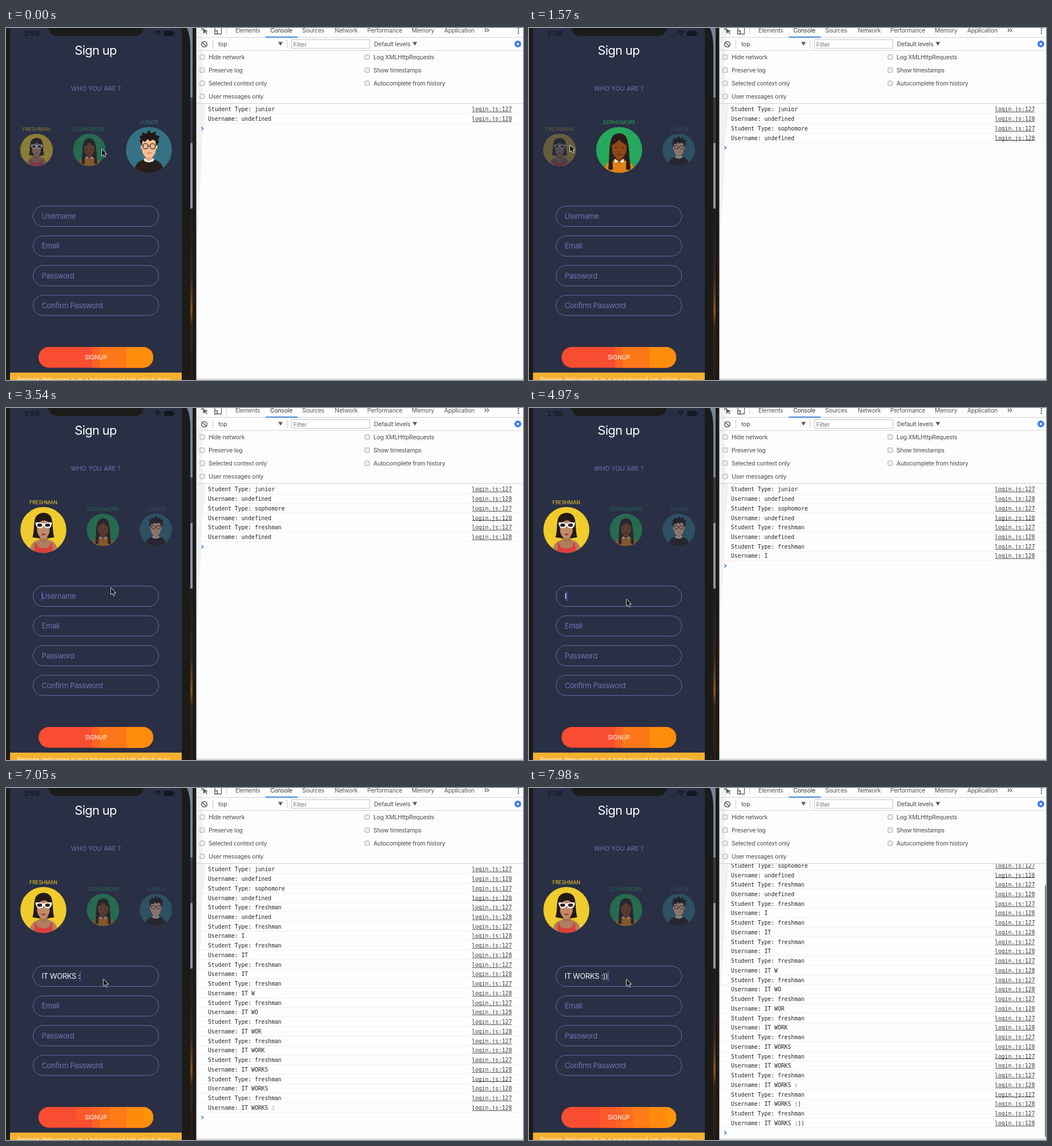
Recreate the animation shown at these times as an HTML page with a canvas. Size 906x618 px, loop 8000 ms.

```html
<!DOCTYPE html>
<html lang="en">
<head>
<meta charset="utf-8">
<title>Sign up form with console</title>
<style>
  html, body { margin: 0; width: 100%; height: 100%; overflow: hidden; background: #fdfdfd; }
  canvas { display: block; width: 906px; height: 618px; }
</style>
</head>
<body>
<canvas id="stage"></canvas>
<script>
const W = 906, H = 618, LOOP = 8000;
const canvas = document.getElementById('stage');
const ctx = canvas.getContext('2d');
const dpr = window.devicePixelRatio || 1;
canvas.width = W * dpr;
canvas.height = H * dpr;

const SANS = 'Inter, "Open Sans", sans-serif';
const MONO = '"DejaVu Sans Mono", "Liberation Mono", monospace';
const SCREEN = '#292f44', BEZEL = '#1b1b19', LINE = '#6470b0';
const TYPED = 'IT WORKS :))';

// ---------- drawing helpers ----------
function rect(x, y, w, h, color) {
  ctx.fillStyle = color;
  ctx.fillRect(x, y, w, h);
}

function fill(path, color) {
  ctx.fillStyle = color;
  ctx.fill(new Path2D(path));
}

function stroke(path, color, width = 1) {
  ctx.strokeStyle = color;
  ctx.lineWidth = width;
  ctx.stroke(new Path2D(path));
}

function ellipse(x, y, rx, ry, color) {
  ctx.fillStyle = color;
  ctx.beginPath();
  ctx.ellipse(x, y, rx, ry, 0, 0, Math.PI * 2);
  ctx.fill();
}

function ring(x, y, r, color, width) {
  ctx.strokeStyle = color;
  ctx.lineWidth = width;
  ctx.beginPath();
  ctx.arc(x, y, r, 0, Math.PI * 2);
  ctx.stroke();
}

function pill(x, y, w, h, r) {
  ctx.beginPath();
  ctx.roundRect(x, y, w, h, r);
}

// y is the middle of the capitals
function text(s, x, y, size, color, { align = 'left', weight = 400, gap = 0, face = SANS } = {}) {
  ctx.font = `${weight} ${size}px ${face}`;
  ctx.letterSpacing = gap + 'px';
  ctx.textAlign = align;
  ctx.fillStyle = color;
  ctx.fillText(s, x, y + size * 0.36);
}

// latest value of a [time, value] list
function at(list, t) {
  let value = list[0][1];
  for (const [time, v] of list) if (t >= time) value = v;
  return value;
}

// ---------- timeline ----------
const cursorMoves = [
  // start, end, steps, x, y
  [120, 120, 1, 153, 211],
  [850, 1330, 5, 72, 206],
  [2160, 2940, 9, 184, 315],
  [3060, 3060, 1, 184, 316],
  [3930, 4290, 4, 171, 336]
];

function cursorAt(t) {
  let x = 168, y = 213;
  for (const [start, end, n, tx, ty] of cursorMoves) {
    if (t < start) break;
    const step = n > 1 ? (end - start) / (n - 1) : 1;
    const k = Math.min(n, Math.floor((t - start) / step + 1e-6) + 1) / n;
    const e = k * k * (3 - 2 * k);
    x += (tx - x) * e;
    y += (ty - y) * e;
  }
  return [x, y];
}

const selected = [[0, 2], [470, 1], [1720, 0]];
const typedCount = [[0, 0], [4970, 1], [5080, 2], [5230, 3], [5560, 4], [5710, 6], [5830, 7],
  [5940, 8], [6480, 9], [7050, 10], [7530, 11], [7980, 12]];
const rowCount = [[0, 2], [470, 4], [1720, 6], [4970, 8], [5080, 9], [5230, 12], [5560, 14],
  [5710, 18], [5830, 20], [5940, 22], [6480, 24], [7050, 26], [7530, 28], [7980, 30]];
const caretOn = [[0, false], [3540, true], [4050, false], [4670, true]];
const alphas = [
  [[0, 0.5], [1570, 0.3], [1720, 0.6], [1830, 0.85], [1950, 1]],
  [[0, 0.5], [350, 0.35], [470, 0.65], [620, 1], [1720, 0.5]],
  [[0, 1], [470, 0.5]]
];

// ---------- avatars, drawn around 0,0 with radius 40 ----------
function drawFreshman() {
  fill('M-24 42 C-24 23 -16 20 -7 17 L-6 6 H7 L8 17 C17 20 25 23 25 42 Z', '#b17d5c');
  fill('M-19 13 C-16 2 -17 -10 -15 -18 C-12 -34 13 -34 15 -18 C17 -10 16 2 19 13 L7 15 H-6 Z', '#241a18');
  fill('M-6 8 H7 V19 Q0 23 -6 19 Z', '#a67252');
  fill('M-11 -15 Q0 -19 11 -15 V2 C10 10 4 16 0 16 C-4 16 -10 10 -11 2 Z', '#c08a68');
  fill('M-12 -9 C-13 -20 -4 -24 0 -24 C8 -24 13 -20 12 -9 Q9 -15 2 -17 Q-7 -16 -12 -9 Z', '#241a18');
  fill('M-16 42 L-15 23 L-13 23 L-10 30 Q0 35 10 30 L13 23 L15 23 L17 42 Z', '#dd3d3c');
  fill('M-14 -13 Q-7 -14 0 -11 Q8 -14 15 -13 Q15 -3 7.5 -3 Q2 -3 0.5 -8 Q-1 -3 -6.5 -3 Q-13 -3 -14 -13 Z', '#fff');
  ellipse(-6.5, -8.2, 4.4, 3, '#2c2628');
  ellipse(7.3, -8.2, 4.4, 3, '#2c2628');
  ellipse(0.3, 8, 3.8, 1.4, '#a9343b');
}

function drawSophomore() {
  fill('M-18 36 C-17 10 -18 0 -15 -15 C-12 -34 12 -34 15 -15 C18 0 17 10 19 36 Z', '#2a1c18');
  fill('M-27 42 C-27 24 -19 21 -8 18 H8 C19 21 27 24 27 42 Z', '#df8214');
  fill('M-6 8 H6 V18 L0 23 L-6 18 Z', '#75370f');
  fill('M-13 -8 Q-5 -12 0 -18 Q6 -12 13 -8 V1 C11 10 4 16 0 16 C-4 16 -11 10 -13 1 Z', '#8e4818');
  fill('M-9 15 L0 21 L9 15 L7 23 L0 20 L-7 23 Z', '#f3eee8');
  fill('M-16 -10 Q-12 -9 -12 2 L-11 34 Q-17 37 -19 33 Z M16 -10 Q12 -9 13 2 L12 34 Q18 37 20 33 Z', '#2a1c18');
  ellipse(-6, -4, 1.6, 1, '#3a2013');
  ellipse(6, -4, 1.6, 1, '#3a2013');
  ellipse(0, 8, 3.8, 1.3, '#642c12');
}

function drawJunior() {
  fill('M-26 42 C-26 24 -17 19 -8 17 H8 C17 19 26 24 26 42 Z', '#271e1a');
  fill('M-6 7 H6 V17 L0 21 L-6 17 Z', '#e3a97f');
  fill('M-12 -20 H12 V1 C11 10 5 14 0 14 C-5 14 -11 10 -12 1 Z', '#f6bd91');
  ellipse(-12.5, -5, 2.3, 3.6, '#f6bd91');
  ellipse(12.5, -5, 2.3, 3.6, '#f6bd91');
  fill('M-13 -8 L-17 -17 L-14 -18 L-17 -25 L-12 -25 L-12 -31 L-5 -28 L0 -35 L4 -29 L12 -32 L12 -26 ' +
    'L19 -24 L16 -18 L18 -14 L13 -8 L11 -16 L6 -18 L2 -15 L-2 -19 L-7 -14 L-11 -16 Z', '#211917');
  ring(-6, -6.5, 4.6, '#2b211f', 1.3);
  ring(6.5, -6.5, 4.6, '#2b211f', 1.3);
  stroke('M-1.5 -7 H2 M-10.5 -8 H-13 M11 -8 H13', '#2b211f', 1.2);
  stroke('M-3 5 Q0 7 4 5', '#a55f4b', 1.2);
  fill('M-9 14 L0 20 L9 14 L8 20 L0 22 L-8 20 Z', '#f5f1ec');
}

const people = [
  ['FRESHMAN', '#efcb2d', drawFreshman],
  ['SOPHOMORE', '#25a85c', drawSophomore],
  ['JUNIOR', '#357283', drawJunior]
];

function drawPeople(t) {
  const chosen = at(selected, t);
  let left = 25;
  people.forEach(([label, color, draw], i) => {
    const big = i === chosen;
    const size = big ? 81 : 57;
    const x = left + size / 2, y = 214;
    const alpha = at(alphas[i], t);
    left += size + 35.5;
    ctx.save();
    ctx.translate(x, y);
    ctx.scale(size / 81, size / 81);
    ctx.beginPath();
    ctx.arc(0, 0, 40.3, 0, Math.PI * 2);
    ctx.clip();
    rect(-41, -41, 82, 82, color);
    draw();
    ctx.globalAlpha = 1 - alpha;
    rect(-41, -41, 82, 82, SCREEN);
    ctx.restore();
    ctx.globalAlpha = alpha;
    text(label, x, big ? 165.5 : 177.5, 8.8, color, { align: 'center' });
    ctx.globalAlpha = 1;
  });
}

// ---------- phone ----------
function drawPhoneShell() {
  rect(0, 0, 334, H, '#1c1a19');
  rect(316, 0, 11, 122, '#76859a');
  rect(322, 122, 5, 80, '#343b4a');
  rect(322, 202, 5, 115, '#8f97a3');
  const dusk = ctx.createLinearGradient(0, 317, 0, H);
  dusk.addColorStop(0, '#201c1a');
  dusk.addColorStop(0.4, '#3a2519');
  dusk.addColorStop(0.6, '#8a5417');
  dusk.addColorStop(0.68, '#3d2413');
  dusk.addColorStop(1, '#2e1c15');
  rect(322, 317, 5, 301, dusk);
  fill('M0 0 H317 Q323 12 323 34 V618 H0 Z', BEZEL);
  rect(7, 0, 301, H, SCREEN);
  fill('M70 0 Q74 0 75 3 Q78 14 90 14 H226 Q238 14 240 3 Q241 0 245 0 Z', BEZEL);
}

function drawStatus() {
  const ink = '#141720';
  text('2:59', 32, 10, 12.3, ink, { weight: 600 });
  for (let i = 0; i < 4; i++) ellipse(245 + i * 3.7, 12.5, 1, 1, '#202536');
  stroke('M260.5 8 Q266 3 271.5 8 M262.8 10.5 Q266 7.6 269.2 10.5', ink, 1.8);
  fill('M264 12 Q266 10.3 268 12 L266 14 Z', ink);
  ctx.fillStyle = ink;
  pill(277, 5, 17, 9, 2.5);
  ctx.fill();
  rect(295, 8, 1.5, 3, ink);
}

function drawFields(t) {
  const gap = -0.4;
  const typed = TYPED.slice(0, at(typedCount, t));
  ['Username', 'Email', 'Password', 'Confirm Password'].forEach((name, i) => {
    const y = 312.7 + i * 52.1;
    pill(47.5, y, 220, 35.8, 17.9);
    ctx.strokeStyle = LINE;
    ctx.lineWidth = 1;
    ctx.stroke();
    const live = i === 0 && typed;
    text(live ? typed : name, 62.5, y + 18, 13, live ? '#f4f5fa' : '#6b77b3', { gap });
  });
  if (at(caretOn, t)) {
    ctx.font = `400 13px ${SANS}`;
    ctx.letterSpacing = gap + 'px';
    rect(62.3 + ctx.measureText(typed).width, 322, 1.6, 17, '#4862e0');
  }
}

function drawBands(bands) {
  for (const [x, color] of bands) rect(x, 560, 258 - x, 37, color);
}

function drawButton(t) {
  ctx.save();
  pill(57, 560, 201, 36.5, 18.2);
  ctx.clip();
  drawBands([[57, '#f94d31'], [151, '#fa6325'], [164, '#fe7718'], [211, '#ff8d0c']]);
  if (t >= 7050) {
    ctx.beginPath();
    ctx.rect(57, 560, 201, t < 7530 ? 23 : 37);
    ctx.clip();
    drawBands([[57, '#f94d31'], [124, '#fb592a'], [151, '#fa6325'], [164, '#fd6f1d'],
      [182, '#fe7b15'], [211, '#ff8b0c'], [243, '#ff960a']]);
  }
  ctx.restore();
  text('SIGNUP', 157.5, 578.5, 10.3, '#fff', { align: 'center' });
}

function drawPhone(t) {
  drawPhoneShell();
  drawStatus();
  text('Sign up', 157, 39, 22, '#fff', { align: 'center', gap: -0.75 });
  text('WHO YOU ARE ?', 157.5, 106, 11, '#6b77b3', { align: 'center' });
  drawPeople(t);
  drawFields(t);
  drawButton(t);
  rect(7, 605, 301, 13, '#f4b02f');
  text('Remote debugger is in a background tab which may', 19, 617, 10.9, '#fff7e4');
}

// ---------- console ----------
const logs = [];
['junior', 'sophomore', 'freshman'].forEach(type => addLog(type, 'undefined'));
for (let i = 1; i <= TYPED.length; i++) addLog('freshman', TYPED.slice(0, i));

function addLog(type, name) {
  logs.push('Student Type: ' + type, 'Username: ' + name);
}

function label(s, x, y, color = '#4a4a4a') {
  text(s, x, y, 10.4, color, { gap: -0.2 });
}

function checkbox(x, y) {
  pill(x - 4, y - 4, 8, 8, 1.5);
  ctx.fillStyle = '#f0f0f0';
  ctx.fill();
  ctx.strokeStyle = '#a2a2a2';
  ctx.lineWidth = 1;
  ctx.stroke();
}

function triangle(x, y) {
  fill(`M${x - 4} ${y - 3} h8 l-4 6.5 Z`, '#5c5c5c');
}

function gear(x, y) {
  const blue = '#3b78e7';
  ctx.save();
  ctx.translate(x, y);
  for (let i = 0; i < 8; i++) {
    rect(-1.5, -6.2, 3, 3.4, blue);
    ctx.rotate(Math.PI / 4);
  }
  ring(0, 0, 3.4, blue, 2.7);
  ctx.restore();
}

function drawToolbar() {
  const tabs = [['Elements', 402], ['Console', 463], ['Sources', 519], ['Network', 576],
    ['Performance', 633], ['Memory', 711], ['Application', 768]];
  for (const [name, x] of tabs) label(name, x, 4, name === 'Console' ? '#333' : '#555');
  stroke('M839 1 l3 3 l-3 3 M843 1 l3 3 l-3 3', '#555', 1.2);
  for (let y = 0; y < 12; y += 4) ellipse(898, y + 1, 1.3, 1.3, '#5a5a5a');
  stroke('M343 0 V4 M343 1 H347', '#5f5f5f', 1.2);
  fill('M345 1 L354 5.5 L350 6.5 L353 10 L351.5 11 L349 7.5 L346 10 Z', '#5f5f5f');
  stroke('M366 0 V10.5 H377.5 V0 M366 10.5 H372', '#5f5f5f', 1.3);
  rect(365, 4, 6, 7, '#5f5f5f');
  rect(366.5, 5.5, 3, 4, '#fcfcfc');
  rect(386, 0, 1, 11, '#ccc');
  rect(334, 16, 572, 1, '#d2d2d2');
  rect(455, 15, 56, 2, '#4285d8');

  ring(347.5, 28.5, 4.8, '#5c5c5c', 1.5);
  stroke('M344.2 25.2 L350.8 31.8', '#5c5c5c', 1.5);
  rect(362, 21, 1, 15, '#ccc');
  label('top', 372, 28);
  triangle(481, 27.5);
  rect(492, 21, 1, 15, '#ccc');
  rect(500, 20, 138, 16, '#c6c6c6');
  rect(501, 21, 136, 14, '#fff');
  label('Filter', 503.5, 29, '#777');
  label('Default levels', 645, 28);
  triangle(716.5, 27.5);
  gear(897, 28);
  rect(334, 39, 572, 1, '#d6d6d6');
}

function drawOptions(x, names) {
  names.forEach((name, i) => {
    checkbox(x, 51 + i * 23);
    label(name, x + 11, 51.7 + i * 22.9);
  });
}

function drawSettings() {
  drawOptions(344, ['Hide network', 'Preserve log', 'Selected context only', 'User messages only']);
  drawOptions(633, ['Log XMLHttpRequests', 'Show timestamps', 'Autocomplete from history']);
  rect(334, 132, 572, 1, '#cfcfcf');
}

function drawLogs(t) {
  const firstY = 142.8, rowH = 16.74, top = 133, view = 482;
  const count = at(rowCount, t);
  const promptY = firstY + rowH * count + 0.4;
  const scroll = Math.max(0, Math.round(promptY - 605));
  ctx.save();
  ctx.beginPath();
  ctx.rect(334, top, 572, view);
  ctx.clip();
  for (let i = 0; i < count; i++) {
    const y = firstY + rowH * i - scroll;
    const link = 'login.js:' + (127 + i % 2);
    rect(334, Math.floor(y + 8), 572, 1, '#f0f0f0');
    text(logs[i], 354, y, 9.72, '#252525', { face: MONO });
    text(link, 886.5, y, 9.72, '#3c3c3c', { face: MONO, align: 'right' });
    rect(816.5, Math.round(y + 4.4), 70, 1, '#555');
  }
  stroke(`M342.3 ${promptY - scroll - 2.8} l3.4 2.8 l-3.4 2.8`, '#3f83f0', 1.5);
  if (scroll > 0) {
    const ratio = view / (view + scroll);
    pill(904, top + scroll * ratio, 4, view * ratio - 2, 2);
    ctx.fillStyle = '#7d7d7d';
    ctx.fill();
  }
  ctx.restore();
}

function drawConsole(t) {
  rect(334, 0, 572, H, '#fdfdfd');
  fill('M334 0 H346 L343 60 L344 132 L349 134 L348 160 L343 200 L342 253 L337 340 L334 480 Z', '#f1f1f1');
  drawToolbar();
  drawSettings();
  drawLogs(t);
  rect(334, 616, 572, 1, '#b4b4b4');
  rect(333, 0, 1, H, '#8d8d8d');
}

function drawCursor(t) {
  const [x, y] = cursorAt(t);
  const arrow = 'M0 0 V11 L2.5 8.8 L4.5 13 L6.3 12.2 L4.5 8.2 H7.8 Z';
  ctx.save();
  ctx.translate(x, y);
  ctx.lineJoin = 'round';
  stroke(arrow, '#fff', 1.5);
  fill(arrow, '#111');
  ctx.restore();
}

const start = performance.now();

function frame() {
  const t = (performance.now() - start) % LOOP;
  ctx.setTransform(dpr, 0, 0, dpr, 0, 0);
  drawPhone(t);
  drawConsole(t);
  drawCursor(t);
  requestAnimationFrame(frame);
}

frame();
</script>
</body>
</html>
```
